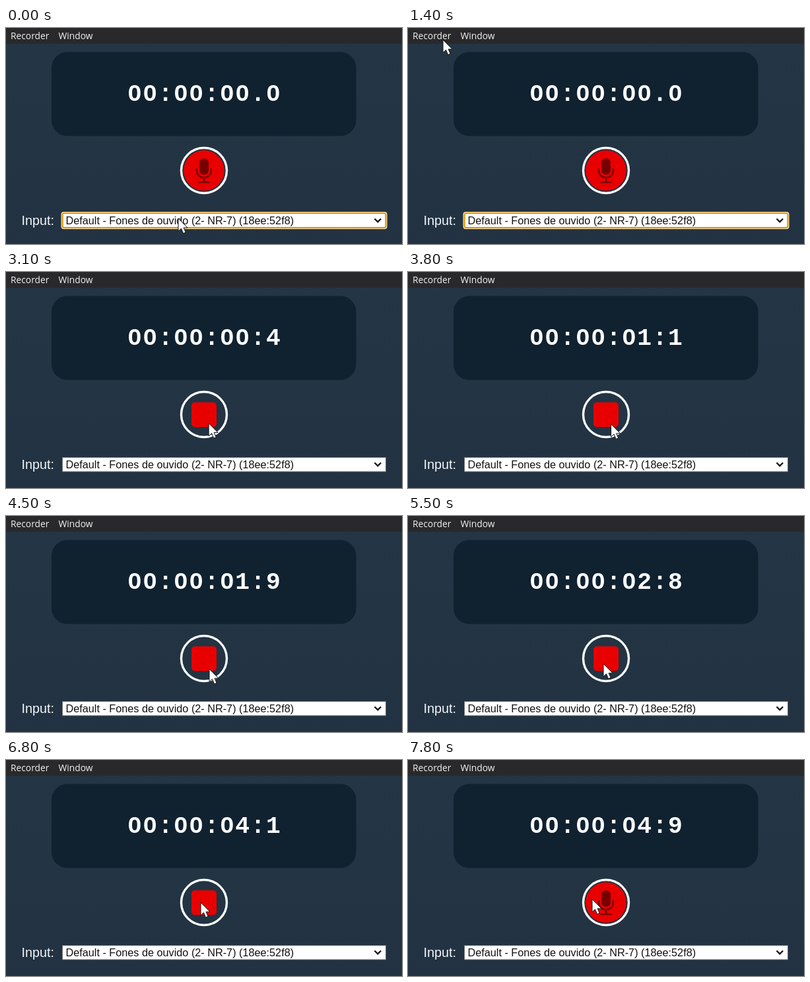
Recreate the animation shown at these times as an HTML page. Size 600 px wide and 329 px high, loop 7.9 s.

```html
<!DOCTYPE html>
<html lang="en">
<head>
<meta charset="utf-8">
<title>Recorder</title>
<style>
  html, body { margin: 0; width: 100%; height: 100%; overflow: hidden; background: #233343; }
  svg { display: block; width: 600px; height: 329px; }
  text { white-space: pre; }
  .menu { font: 13.8px "Open Sans", sans-serif; fill: #f2f2f2; }
  .label { font: 19.8px "Liberation Sans", Arial, sans-serif; fill: #f4f6f8; }
  .option { font: 16.24px "Liberation Sans", Arial, sans-serif; fill: #111; }
  #clock { font: bold 36.4px "Liberation Mono", "Courier New", monospace; letter-spacing: 1.5px; fill: #fff; }
</style>
</head>
<body>
<svg viewBox="0 0 600 329">
  <defs>
    <linearGradient id="sky" x1="0" y1="0" x2="0" y2="1">
      <stop offset="0" stop-color="#243645"/>
      <stop offset="1" stop-color="#223242"/>
    </linearGradient>
  </defs>
  <rect width="600" height="329" fill="url(#sky)"/>
  <rect width="600" height="24" fill="#29292b"/>
  <text class="menu" x="7" y="17">Recorder</text>
  <text class="menu" x="79.5" y="17">Window</text>

  <rect x="69" y="36.5" width="461.5" height="128" rx="24" fill="#102130"/>
  <text id="clock" x="184" y="110.5"></text>
  <g id="holes" fill="#102130"></g>

  <circle cx="300" cy="217" r="34.5" fill="none" stroke="#fff" stroke-width="3.4"/>
  <g id="mic">
    <circle cx="300" cy="217" r="30.8" fill="#e80000"/>
    <rect x="293" y="198.5" width="14" height="25" rx="7" fill="#760000"/>
    <path d="M289 214v3a11 11 0 0 0 22 0v-3M300 228v7M291.5 235h17" fill="none" stroke="#760000" stroke-width="2.4"/>
  </g>
  <rect id="stop" x="281" y="198.5" width="38" height="37.5" rx="5" fill="#e80000"/>

  <text class="label" x="23.5" y="300">Input:</text>
  <rect x="85.5" y="282.5" width="490" height="21.5" fill="#fff" stroke="#767676"/>
  <g id="focus">
    <rect x="83.5" y="280" width="494" height="26.2" rx="4" fill="#fff1d2"/>
    <rect x="85.6" y="282" width="489.8" height="22.2" rx="2.5" fill="#fff" stroke="#e0960f" stroke-width="2.2"/>
  </g>
  <text class="option" x="90.5" y="298.5">Default - Fones de ouvido (2- NR-7) (18ee:52f8)</text>
  <path d="M558.5 290.5l4.8 4.8l4.8-4.8" fill="none" stroke="#111" stroke-width="2.3"/>

  <path id="cursor" d="M0 0V19.5L4.5 15.4L7.6 22.8L11.2 21.3L8.1 14.2H14Z" fill="#fff" stroke="#111" stroke-linejoin="round"/>
</svg>
<script>
const LOOP = 7900, STEP = 100;
const BLUR = 2100, START = 2200, END = 7800, FIRST_TICK = 2700;

// time, x, y of the pointer tip
const path = [
  [0, 261, 290], [200, 252, 272], [800, 33, 3], [1000, 50, 3], [1300, 50, 3],
  [1400, 53, 18], [2000, 300, 227], [2900, 307, 230], [4500, 308, 233],
  [5000, 304, 230], [5500, 296, 225], [6800, 295, 217], [7800, 279, 212]
];
// time, tenths of a second on the clock
const ticks = [[FIRST_TICK, 0], [3100, 4], [4500, 19], [5500, 28], [6800, 41], [END, 49]];

const el = id => document.getElementById(id);
const clock = el("clock"), cursor = el("cursor"), holes = [];
const show = (node, on) => node.setAttribute("visibility", on ? "visible" : "hidden");

// plain zeros: cover the dot inside each monospaced zero
for (let i = 0; i < 10; i++) {
  const hole = document.createElementNS("http://www.w3.org/2000/svg", "ellipse");
  const shape = { cx: 184 + 23.34 * i + 10.92, cy: 98.6, rx: 3.1, ry: 5.6 };
  for (const key in shape) hole.setAttribute(key, shape[key]);
  holes.push(el("holes").appendChild(hole));
}

function at(keys, t, col) {
  if (t <= keys[0][0]) return keys[0][col];
  const i = keys.findIndex(k => k[0] >= t);
  if (i < 0) return keys[keys.length - 1][col];
  const a = keys[i - 1], b = keys[i];
  return a[col] + (b[col] - a[col]) * (t - a[0]) / (b[0] - a[0]);
}

function clockText(t) {
  if (t < FIRST_TICK) return "00:00:00.0";
  const n = Math.floor(at(ticks, t, 1) + 0.001);
  return "00:00:" + String(Math.floor(n / 10)).padStart(2, "0") + ":" + n % 10;
}

function draw(t) {
  const text = clockText(t), recording = t >= START && t < END;
  clock.textContent = text;
  holes.forEach((hole, i) => show(hole, text[i] === "0"));
  show(el("mic"), !recording);
  show(el("stop"), recording);
  show(el("focus"), t < BLUR);
  cursor.setAttribute("transform", `translate(${at(path, t, 1)} ${at(path, t, 2)})`);
}

const origin = performance.now();
function frame() {
  const t = (performance.now() - origin) % LOOP;
  draw(Math.floor(t / STEP) * STEP);
  requestAnimationFrame(frame);
}
frame();
</script>
</body>
</html>
```
